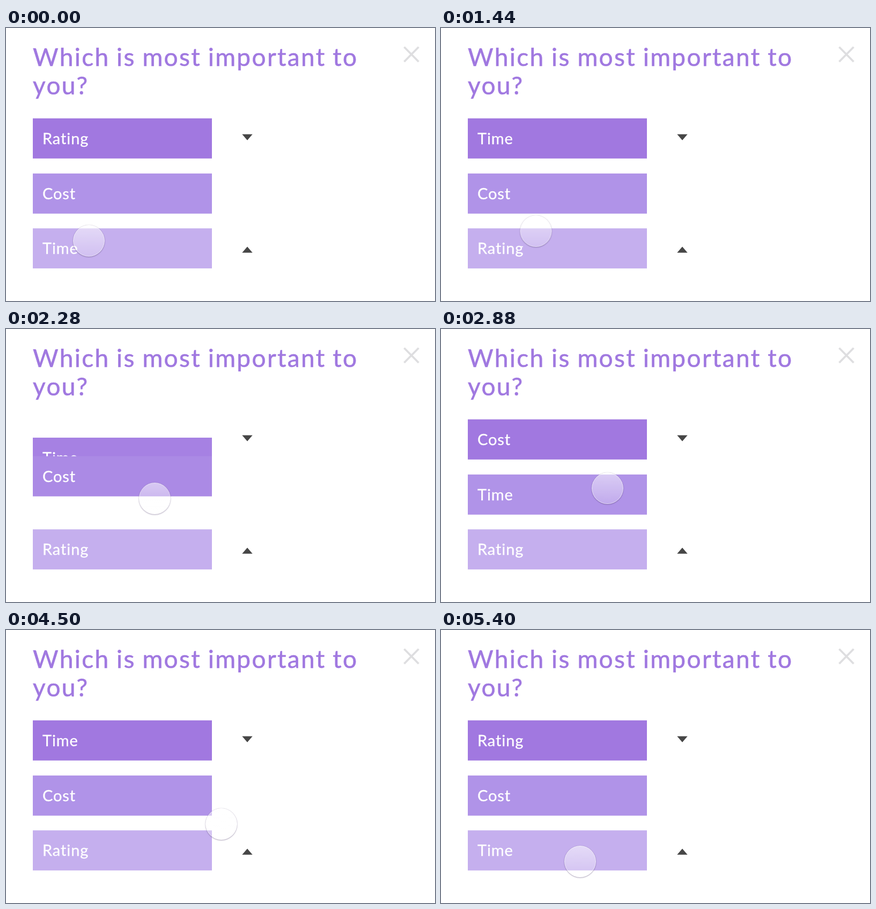
These frames come from a looping animation (800x510 px, 5900 ms). An HTML page:

```html
<!DOCTYPE html>
<html lang="en">
<head>
<meta charset="utf-8">
<title>Priority picker</title>
<style>
  html, body { margin: 0; width: 100%; height: 100%; overflow: hidden; background: #fff; }
  #stage { position: relative; width: 800px; height: 510px; overflow: hidden; font-family: Lato, sans-serif; }
  #stage > * { position: absolute; }
  h1 { left: 50px; top: 27px; margin: 0; color: #a078e0; font-size: 46px; font-weight: 400;
       line-height: 53px; letter-spacing: 2.35px; word-spacing: -1.5px; white-space: nowrap;
       -webkit-text-stroke: .6px #a078e0; }
  .bar { left: 50px; top: 0; width: 316px; height: 75px; padding-left: 18px; color: #fff;
         font-size: 29px; line-height: 74px; letter-spacing: .9px; -webkit-text-stroke: .35px #fff; }
  .ripple { width: 108px; height: 108px; margin: -54px; border-radius: 50%; z-index: 5; opacity: 0; }
  svg { left: 0; top: 0; z-index: 6; }
  #touch { left: -29px; top: -29px; width: 57px; height: 57px; border-radius: 50%; z-index: 7;
           border: 1px solid rgba(255,255,255,.5);
           background: linear-gradient(rgba(255,255,255,.55), rgba(255,255,255,.22)) border-box;
           box-shadow: 0 0 1px rgba(70,50,100,.55), 0 1px 2px rgba(70,50,100,.4); }
</style>
</head>
<body>
<div id="stage">
  <h1>Which is most important to<br>you?</h1>
  <svg width="800" height="510">
    <path d="M742.5 35.5 769.5 63M769.5 35.5 742.5 63" stroke="#dedee0" stroke-width="3.8"/>
    <path d="M440.3 198.5h19.4L450 209.7zM440.3 419.8h19.4L450 408.4z" fill="#464646"/>
  </svg>
  <div id="touch"></div>
</div>
<script>
const LOOP = 5900, STEP = 60, LAST = 5400, SWAP = 600;
const stage = document.getElementById('stage');
const slots = [
  { y: 168.8, color: 'rgb(161,120,224)' },
  { y: 271.8, color: 'rgb(176,147,232)' },
  { y: 374.3, color: 'rgb(197,175,238)' }
];
const swapStarts = [60, 2040, 3540, 4800];
// slot of each item before and after every swap
const ranks = {
  Rating: [0, 2, 2, 2, 0],
  Cost:   [1, 1, 0, 1, 1],
  Time:   [2, 0, 1, 0, 2]
};
// time, x, y, easing towards the next point
const path = [
  [0, 154, 397, 'ease-out'], [600, 160, 400, 'linear'], [1260, 160, 400, 'ease-in-out'],
  [1800, 231, 309, 'linear'], [2040, 270, 320, 'ease-in-out'], [2880, 310, 297, 'ease-in-out'],
  [3420, 452, 202, 'linear'], [4080, 452, 203, 'ease-in'], [4500, 401, 362, 'ease-out'],
  [4800, 259, 432, 'linear'], [LOOP, 259, 432, 'linear']
];
const taps = [
  [0, 154, 397, '#fff'], [1860, 231, 309, '#fff'],
  [3480, 452, 202, '#dcc6f7'], [4740, 259, 432, '#fff']
];

const anims = [];
const add = (el, frames, opts) => {
  const a = el.animate(frames, { fill: 'none', ...opts });
  a.pause();
  anims.push(a);
};
const make = cls => {
  const el = document.createElement('div');
  el.className = cls;
  return stage.appendChild(el);
};

function pose(time, rank, goal, easing) {
  const { y, color } = slots[rank];
  return {
    offset: time / LOOP, easing, zIndex: 3 - goal,
    transform: `translateY(${y}px)`, backgroundColor: color
  };
}

for (const [name, order] of Object.entries(ranks)) {
  const bar = make('bar');
  bar.textContent = name;
  const frames = [pose(0, order[0], order[0], 'linear')];
  swapStarts.forEach((start, i) => {
    const from = order[i], to = order[i + 1];
    frames.push(
      pose(start, from, from, 'linear'),
      pose(start, from, to, 'ease-in-out'),
      pose(start + SWAP, to, to, 'linear')
    );
  });
  frames.push(pose(LOOP, order[4], order[4], 'linear'));
  add(bar, frames, { duration: LOOP });
}

for (const [delay, x, y, color] of taps) {
  const el = make('ripple');
  Object.assign(el.style, { left: x + 'px', top: y + 'px', background: color });
  const timing = { delay, duration: 360 };
  add(el, { transform: ['scale(0)', 'scale(1)'] }, { ...timing, easing: 'ease-out' });
  add(el, { opacity: [.4, .4, 0] }, timing);
}

add(document.getElementById('touch'), path.map(([time, x, y, easing]) => ({
  offset: time / LOOP, easing, transform: `translate(${x}px, ${y}px)`
})), { duration: LOOP });

const origin = performance.now();
function tick() {
  const t = Math.max(0, performance.now() - origin) % LOOP;
  const shown = Math.min(LAST, Math.floor(t / STEP) * STEP);
  for (const a of anims) a.currentTime = shown;
  requestAnimationFrame(tick);
}
tick();
</script>
</body>
</html>
```
